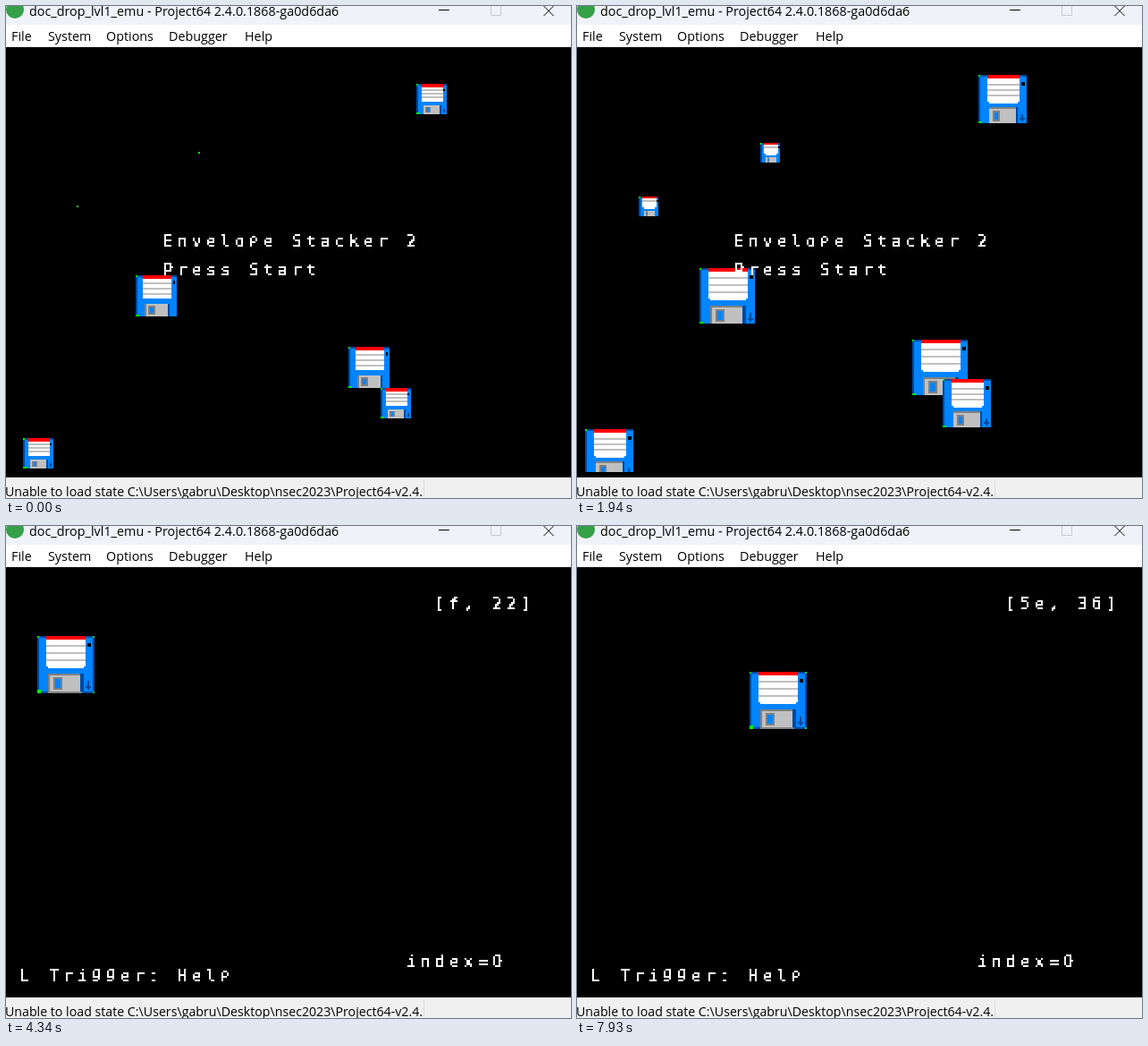
Write an HTML page with a canvas that moves like this. It is 632x550 px and loops after 8000 ms.

```html
<!DOCTYPE html>
<html lang="en">
<head>
<meta charset="utf-8">
<title>Emulator window</title>
<style>
html, body { margin: 0; width: 100%; height: 100%; overflow: hidden; background: #000; }
canvas { position: absolute; left: -1px; top: 45px; width: 634px; height: 484px; image-rendering: pixelated; }
svg { position: absolute; left: 0; top: 0; font: 14.35px "Open Sans", "Noto Sans", sans-serif; }
</style>
</head>
<body>
<canvas id="game" width="317" height="242"></canvas>
<svg width="632" height="550">
  <rect width="632" height="21" fill="#eff3f9"/>
  <rect y="21" width="632" height="25" fill="#fff"/>
  <circle cx="10" cy="4" r="10" fill="#35a048"/>
  <g fill="none" stroke="#000">
    <path d="M484 4.5H496M601.5 0L612.5 11M612.5 0L601.5 11"/>
    <path d="M542.5 0V10.5H553.5V0" stroke="#c6c9ce"/>
  </g>
  <rect y="527" width="632" height="23" fill="#f0f0f0"/>
  <path d="M467.5 529V549" stroke="#dcdcdc"/>
  <text x="26" y="11">doc_drop_lvl1_emu - Project64 2.4.0.1868-ga0d6da6</text>
  <text x="6" y="39">File</text>
  <text x="47" y="39">System</text>
  <text x="112" y="39">Options</text>
  <text x="182" y="39">Debugger</text>
  <text x="267" y="39">Help</text>
  <text x="-1" y="548" font-size="14.2">Unable to load state C:\Users\gabru\Desktop\nsec2023\Project64-v2.4.</text>
</svg>
<script>
// The game is drawn at half resolution; one game pixel is 2 x 2 on the stage.
const W = 317, H = 242, LOOP = 8000, SPRITE = 32;
const game = document.getElementById('game').getContext('2d');
game.imageSmoothingEnabled = false;

function layer(w, h) {
  const canvas = document.createElement('canvas');
  canvas.width = w;
  canvas.height = h;
  return canvas.getContext('2d', { willReadFrequently: true });
}

const clamp = (v, lo, hi) => Math.min(hi, Math.max(lo, v));
const gameX = x => (x + 1) / 2;
const gameY = y => (y - 45) / 2;

// The sprite sits in a larger sheet so that it can be sampled from just outside.
function makeFloppy() {
  const c = layer(2 * SPRITE, 2 * SPRITE);
  c.translate(SPRITE, SPRITE);
  const box = (color, x, y, w, h) => { c.fillStyle = color; c.fillRect(x, y, w, h); };
  const edge = '#0048a0', blue = '#0084ff', grey = '#c0c0c0', dark = '#808080';
  box(edge, 0, 0, 32, 32);
  box(blue, 1, 1, 30, 30);
  box('#f00', 5, 0, 22, 2);
  box('#fff', 5, 2, 22, 15);
  box('#fff', 6, 17, 20, 1);
  for (const y of [5, 9, 13]) box(grey, 5, y, 22, 1);
  box('#000', 28, 4, 2, 2);
  box(dark, 6, 21, 19, 11);
  box(grey, 7, 22, 17, 9);
  box(edge, 24, 21, 2, 10);
  box(dark, 9, 23, 5, 7);
  box(blue, 10, 24, 3, 5);
  box(edge, 28, 25, 1, 5);
  box(edge, 27, 28, 3, 1);
  for (const [x, y] of [[0, 0], [31, 0], [31, 31]]) box('#0f0', x, y, 1, 1);
  box('#0f0', 0, 30, 2, 2);
  return c.canvas;
}

const floppy = makeFloppy();

// Each pixel takes the texel under its top left corner, not its centre.
function drawFloppy(x, y, size) {
  const from = SPRITE - SPRITE / size / 2 + 0.02;
  game.drawImage(floppy, from, from, SPRITE, SPRITE, x, y, size, size);
}

const ink = layer(W, H);
ink.textAlign = 'center';
ink.fillStyle = '#fff';

// Each line is [text, left, baseline] in stage pixels, set in 16 px cells.
function print(lines) {
  ink.clearRect(0, 0, W, H);
  for (const [text, left, baseline] of lines) {
    [...text].forEach((ch, i) => {
      const small = ch === 'p';
      ink.font = `${small ? 7.5 : 9.5}px "DejaVu Sans Mono", monospace`;
      const glyph = small ? 'P' : ch === '0' ? 'O' : ch;
      const lift = ch === 'g' ? 2 : 0;
      ink.fillText(glyph, gameX(left + 16 * i) + 3, gameY(baseline) - lift);
    });
  }
  // Hard edges give the look of a bitmap font.
  const image = ink.getImageData(0, 0, W, H);
  for (let i = 3; i < image.data.length; i += 4) image.data[i] = image.data[i] > 100 ? 255 : 0;
  ink.putImageData(image, 0, 0);
  game.drawImage(ink.canvas, 0, 0);
}

// Centre and smallest size of each pulsing disk.
const disks = [
  [476, 104, 32.5], [216, 164, 0.3], [80, 224, 0.3], [168, 324, 44],
  [406, 404, 44], [436, 444, 32.5], [36, 500, 32.5]
];

function drawTitle(t) {
  const step = Math.floor((t + 15) / 69.4);
  const grow = 9.9 * (1 + Math.cos(2 * Math.PI * (step - 28) / 11.1));
  for (const [x, y, base] of disks) {
    const size = 2 * Math.round((base + grow - 2) / 4) + 1;
    drawFloppy(gameX(x) - size / 2, gameY(y) - size / 2, size);
  }
  game.clearRect(0, 238, W, H);
  print([['Envelope Stacker 2', 175, 269], ['Press Start', 175, 301]]);
}

function diskPosition(t) {
  const speed = 5.1;
  if (t < 3630) return [0, 0];
  if (t < 7450) {
    const step = Math.floor((t - 3630) / 70.4) + 1;
    return [
      clamp(Math.round((step - 8) * speed), 0, 76),
      clamp(Math.round((step - 0.8) * speed), 0, 34)
    ];
  }
  const step = Math.floor((t - 7445) / 68.5) + 1;
  const path = Math.round((step - 0.6) * speed);
  return [76 + clamp(path, 0, 18), 34 + clamp(path - 18, 0, 20)];
}

function drawLevel(t) {
  const [x, y] = diskPosition(t);
  drawFloppy(gameX(5) + x, gameY(55) + y, SPRITE);
  const lines = [
    [`[${x.toString(16)}, ${y.toString(16)}]`, 479, 93],
    ['L Trigger: Help', 15, 509],
    ['index=0', 447, 493]
  ];
  if (t >= 5710 && t < 7050) {
    lines.push(['Drop a document with Z', 207, 301], ['Print with R', 207, 333]);
  }
  print(lines);
}

function frame() {
  const t = performance.now() % LOOP;
  game.clearRect(0, 0, W, H);
  if (t < 2700) drawTitle(t);
  else drawLevel(t);
  requestAnimationFrame(frame);
}
frame();
</script>
</body>
</html>
```
